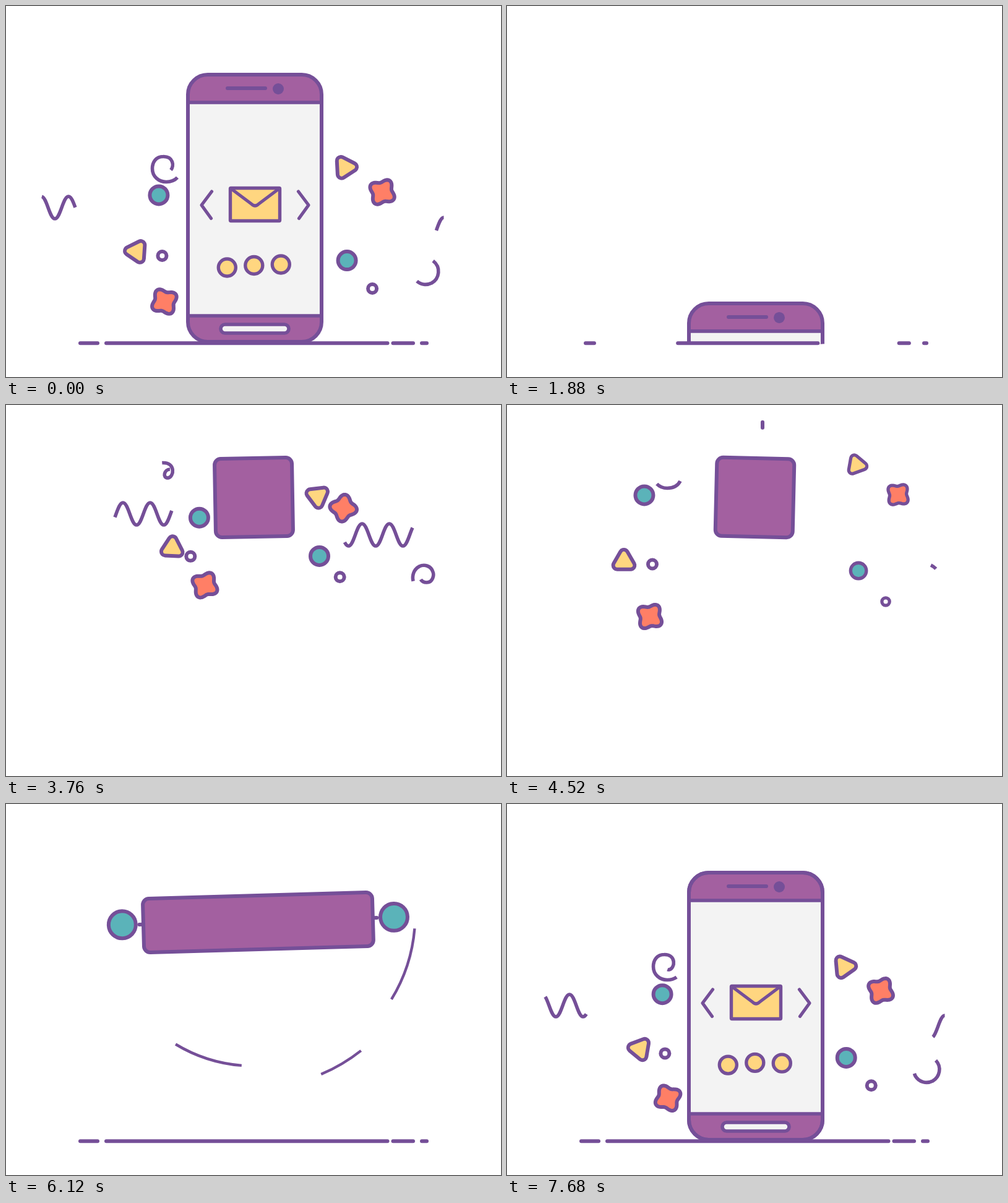
An HTML page with a canvas for the animation above (7720 ms loop, 800 px wide and 600 px high).

```html
<!DOCTYPE html>
<html lang="en">
<head>
<meta charset="utf-8">
<title>Phone confetti</title>
<style>
html, body { margin: 0; width: 100%; height: 100%; overflow: hidden; background: #fff; }
canvas { display: block; width: 800px; height: 600px; }
</style>
</head>
<body>
<canvas id="stage" width="800" height="600"></canvas>
<script>
const LOOP = 7720;
const INK = '#754f98', PLUM = '#a360a0', SCREEN = '#f3f3f3';
const YELLOW = '#ffd680', RED = '#ff7f66', TEAL = '#5bb3b9';
const c = document.getElementById('stage').getContext('2d');

const clamp = v => Math.max(0, Math.min(1, v));
const span = (t, a, b) => clamp((t - a) / (b - a));
const sine = u => (1 - Math.cos(Math.PI * u)) / 2;
const quadIn = u => u * u;
const back = u => 1 + 2.4 * (u - 1) ** 3 + 1.4 * (u - 1) ** 2;
const ease = (t, a, b) => sine(span(t, a, b));
const mix = (a, b, u) => a + (b - a) * u;
const rad = d => d * Math.PI / 180;

function pen(width, cap = 'round') {
  c.strokeStyle = INK;
  c.lineWidth = width;
  c.lineCap = cap;
  c.lineJoin = 'round';
}

function line(pts, width) {
  c.beginPath();
  pts.forEach(p => c.lineTo(p[0], p[1]));
  pen(width);
  c.stroke();
}

function shape(fill, width = 6) {
  if (fill) { c.fillStyle = fill; c.fill(); }
  pen(width);
  c.stroke();
}

function disc(x, y, r, fill, width) {
  c.beginPath();
  c.arc(x, y, r, 0, 7);
  shape(fill, width);
}

function box(cx, cy, w, h, r, fill, width) {
  c.beginPath();
  c.roundRect(cx - w / 2, cy - h / 2, w, h, r);
  shape(fill, width);
}

function at(x, y, scale, turn, draw) {
  if (scale <= 0) return;
  c.save();
  c.translate(x, y);
  c.rotate(rad(turn));
  c.scale(scale, scale);
  draw();
  c.restore();
}

// A path that can be stroked between two distances
function track(d) {
  const el = document.createElementNS('http://www.w3.org/2000/svg', 'path');
  el.setAttribute('d', d);
  return { path: new Path2D(d), len: el.getTotalLength() };
}

function trim(tr, from, to, width, cap) {
  from = Math.max(0, from);
  to = Math.min(tr.len, to);
  if (to - from < 0.1) return;
  c.save();
  pen(width, cap);
  c.setLineDash([to - from, tr.len * 2]);
  c.lineDashOffset = -from;
  c.stroke(tr.path);
  c.restore();
}

function wave(x, y, dir) {
  let d = `M${x} ${y}`;
  for (let i = 0; i < 10; i++) {
    const h = i % 2 ? -36 : 36;
    d += `c${9 * dir} 0 ${13 * dir} ${h} ${22 * dir} ${h}`;
  }
  return track(d);
}

// Streamers: track, head start/end, tail start/end
const streamers = [
  [wave(277, 308, -1), 8, 960, 355, 1205],
  [wave(487.5, 342, 1), -174, 751, 128, 1068],
  [track('M265 254C256 254 252 268 262 268C272 266 274 243 254 243.500C242 243.500 236.500 253 236.500 263C236.500 276 247 284.500 259 284.500C268 284.500 276 281 280 273'), -15, 1060, 677, 1537],
  [track('M669 426C669 434 674 437 680 437C690 437 692 425 690 420C687 410 676 407 668 411C657 417 655 430 660 440C666 450 678 453 688 448C702 440 704 418 685 409'), -195, 1080, 337, 1387]
];

const kinds = {
  ball: () => disc(0, 0, 14.5, TEAL),
  ring: () => disc(0, 0, 7, '#fff'),
  tri() {
    c.beginPath();
    for (const a of [-90, 30, 150]) c.lineTo(12.5 * Math.cos(rad(a)), 12.5 * Math.sin(rad(a)));
    c.closePath();
    pen(19);
    c.stroke();
    c.fillStyle = c.strokeStyle = YELLOW;
    c.lineWidth = 7;
    c.fill();
    c.stroke();
  },
  star() {
    c.beginPath();
    for (let i = 0; i < 72; i++) {
      const a = rad(i * 5), r = 18.7 - 3.3 * Math.cos(4 * a);
      c.lineTo(r * Math.cos(a), r * Math.sin(a));
    }
    c.closePath();
    shape(RED);
  }
};

// kind, two points on the flight, turn at both
const bits = [
  ['ball', 247, 306, 222, 296, 0, 0],
  ['tri', 211, 397, 189, 403, 34, 0],
  ['ring', 252.5, 404, 235, 407.5, 0, 0],
  ['star', 256, 478, 231, 492, 14, -9],
  ['tri', 548, 261, 565, 247, -33, -20],
  ['star', 608, 301, 632, 295, -13, -4],
  ['ball', 551, 411.5, 568, 418, 0, 0],
  ['ring', 592, 457, 612, 468, 0, 0]
];

const drag = t => Math.exp(-t / 720);

function burst(t, dy) {
  if (t < -200 || t > 1700) return;
  c.save();
  c.translate(0, dy);
  for (const [tr, h0, h1, t0, t1] of streamers)
    trim(tr, ease(t, t0, t1) * tr.len, ease(t, h0, h1) * tr.len, 5.6, 'butt');
  const u = (drag(920) - drag(Math.max(0, t))) / (drag(920) - drag(1220));
  for (const [kind, x0, y0, x1, y1, r0, r1] of bits) {
    const left = x0 < 400;
    const grow = left ? ease(t, 20, 260) : ease(t, -70, 150);
    const out = left ? ease(t, 1230, 1580) : ease(t, 1140, 1500);
    at(mix(x0, x1, u), mix(y0, y1, u), grow * (1 - out), mix(r0, r1, u), kinds[kind]);
  }
  c.restore();
}

function ground(t) {
  const k = t < 3000 ? 1 - ease(t, 1550, 2210) : ease(t, 4900, 5300);
  if (k <= 0) return;
  for (const [a, b] of [[120, 148], [162, 616.5], [625.5, 658], [672, 680]]) {
    const m = (a + b) / 2, r = (b - a) / 2 * k;
    line([[m - r, 545.2], [m + r, 545.2]], 6);
  }
}

const pipes = [
  track('M444 -4V498A16 16 0 0 0 460 514H610A78 78 0 0 1 688 592V760'),
  track('M354 -4V498A16 16 0 0 1 338 514H188A78 78 0 0 0 110 592V760')
];

function drawPipes(t) {
  if (t < 2100 || t > 3500) return;
  const tail = 344 + (t - 2920);
  for (const p of pipes) trim(p, tail, tail + 442, 7, 'round');
}

// time, centre x, centre y, width, height, corner, easing into it
const bodyKeys = [
  [3150, 400, 150, 0, 0, 0, sine],
  [3450, 400.5, 149.5, 125, 127, 10, back],
  [4520, 400.5, 149.5, 125, 127, 10, sine],
  [5200, 420, 190, 87, 371, 10, sine],
  [5560, 423, 201, 87, 371, 10, sine],
  [6300, 405, 190, 87, 371, 10, sine],
  [6680, 407.8, 446, 103, 187, 30, quadIn],
  [6860, 407.8, 446, 103, 187, 30, sine],
  [7160, 402, 327, 216, 432, 32, back]
];

function bodyAt(t) {
  const i = bodyKeys.findIndex(k => k[0] > t);
  if (i < 0) return bodyKeys[bodyKeys.length - 1].slice(1, 6);
  const a = bodyKeys[i - 1], b = bodyKeys[i];
  const u = b[6](span(t, a[0], b[0]));
  return [1, 2, 3, 4, 5].map(n => Math.max(0, mix(a[n], b[n], u)));
}

const spin = t => -1 + 720 * ease(t, 4442, 6625) + 1.4 * ease(t, 6500, 6800) - 0.4 * ease(t, 6860, 7100);

// radius, tail angle, head angle
const swooshes = [[244, 85.2, 225.5], [261, -5.2, 135.8], [279.5, 90, 171.4]];

function drawSwooshes(t) {
  const k = ease(t, 4950, 5350) * (1 - ease(t, 5800, 6250));
  if (k <= 0) return;
  const turn = spin(t) - spin(5560);
  for (const [r, a, b] of swooshes) {
    c.beginPath();
    c.arc(400.3, 179.7, r, rad(b + turn - (b - a) * k), rad(b + turn));
    pen(4.4, 'butt');
    c.stroke();
  }
}

function baton(t) {
  const [x, y, w, h, r] = bodyAt(t);
  const e = ease(t, 4700, 5100) * (1 - ease(t, 6050, 6300));
  at(x, y, 1, spin(t), () => {
    if (e > 0) for (const s of [-1, 1]) {
      line([[2, s * h / 2], [2, s * (h / 2 + 8 * e)]], 6);
      disc(3 * e, s * (h / 2 + 42 * e), 27 * e, TEAL);
    }
    if (w > 0) box(0, 0, w, h, r, PLUM);
  });
  if (t > 6780 && t < 6960) {
    c.fillStyle = INK;
    c.fillRect(395.5, 495.5, 6, 6);
  }
}

// Vertical spark above the square
function spark(t) {
  if (t < 4440 || t > 4640) return;
  const y = 32.5 - (t - 4520) * 0.35;
  line([[413, y - 4.5], [413, y + 4.5]], 6);
}

// Time here counts from the start of the loop, negative while building up
function details(t) {
  const pop = (a, b) => back(span(t, a, b));
  const open = ease(t, -800, -480);
  if (open > 0) {
    c.fillStyle = SCREEN;
    c.fillRect(297, 328.5 - 172.5 * open, 210, 345 * open);
    for (const s of [-1, 1]) line([[294, 328.5 + s * 172.5 * open], [510, 328.5 + s * 172.5 * open]], 5.6);
  }
  const bar = 30.5 * ease(t, -640, -400);
  if (bar > 0) line([[388.5 - bar, 133], [388.5 + bar, 133]], 6);
  at(440, 134, pop(-600, -380), 0, () => {
    c.beginPath();
    c.arc(0, 0, 9, 0, 7);
    c.fillStyle = INK;
    c.fill();
  });
  const w = 114 - 4 * Math.exp(-t / 100);
  if (w > 6) box(402, 522, w, 14, 7, SCREEN, 5.6);

  at(402.5, 321, pop(-560, -260), 0, () => {
    box(0, 0, 80, 53, 1, YELLOW, 5.4);
    c.beginPath();
    c.moveTo(-38, -25);
    c.lineTo(-6, -1);
    c.quadraticCurveTo(0, 5, 6, -1);
    c.lineTo(38, -25);
    pen(5.2);
    c.stroke();
  });
  for (const s of [-1, 1])
    at(402.5 + s * 78, 322, pop(-480, -200), 0, () =>
      line([[-s * 8, -22], [s * 8.5, 0], [-s * 7, 21.5]], 5.2));
  [49, -7, -150].forEach((phase, i) => {
    const y = 420 + 4 * Math.sin(rad(phase + 360 * t / 800));
    at(357.3 + 43.5 * i, y, pop(-500 + 60 * i, -240 + 60 * i), 0, () => disc(0, 0, 14, YELLOW, 5.4));
  });
}

function phone(t) {
  const drop = 445 * ease(t, 1450, 2040);
  c.save();
  c.beginPath();
  c.rect(0, 0, 800, 546.5);
  c.clip();
  c.translate(0, drop);
  box(402, 327, 216, 432, 32, PLUM);
  details(t);
  c.restore();
}

function draw(t) {
  c.clearRect(0, 0, 800, 600);
  drawPipes(t);
  burst(t - 3300, -150);
  burst(t < 2000 ? t + 920 : t - 6800, 0);
  drawSwooshes(t);
  spark(t);
  if (t < 2040) phone(t);
  if (t >= 3150) {
    baton(t);
    if (t > 6900) {
      const [x, y, w, h, r] = bodyAt(t);
      c.save();
      c.beginPath();
      c.roundRect(x - w / 2, y - h / 2, w, h, r);
      c.clip();
      details(t - LOOP);
      c.restore();
      box(x, y, w, h, r);
    }
  }
  ground(t);
}

const start = performance.now();
function tick() {
  draw((performance.now() - start) % LOOP);
  requestAnimationFrame(tick);
}
tick();
</script>
</body>
</html>
```
